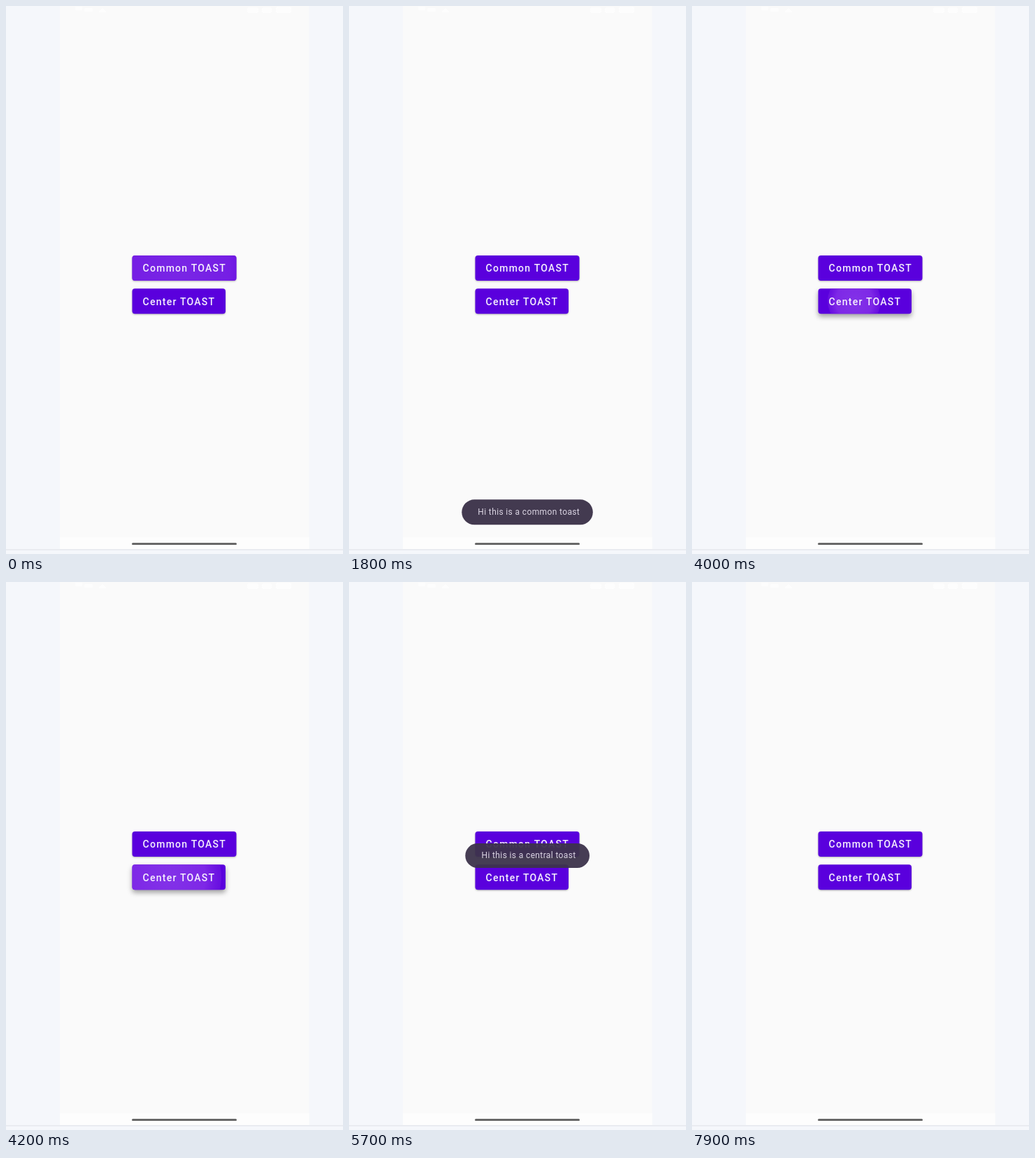
Write an HTML page that moves like this. It is 482 px wide and 782 px high and loops after 8 s.

```html
<!DOCTYPE html>
<html lang="en">
<head>
<meta charset="utf-8">
<style>
  html, body { margin: 0; width: 100%; height: 100%; overflow: hidden; background: #f5f7fb; }
  svg { display: block; }
  text { font-family: Roboto, "Open Sans", sans-serif; }
  .label { font-size: 14px; font-weight: 500; letter-spacing: 1.25px; fill: #f6f1fd; }
  .note { font-size: 12px; letter-spacing: .37px; fill: #dcd6e4; }
  .status { fill: #fff; opacity: .75; }
</style>
</head>
<body>
<svg width="482" height="782" viewBox="0 0 482 782">
  <defs>
    <clipPath id="commonClip"><rect x="180.5" y="356" width="149" height="36" rx="4"/></clipPath>
    <clipPath id="centerClip"><rect x="180.5" y="403.3" width="133.5" height="36" rx="4"/></clipPath>
    <radialGradient id="glow">
      <stop offset="0" stop-color="#8a3bea"/>
      <stop offset=".7" stop-color="#842fe8"/>
      <stop offset="1" stop-color="#7a22e4" stop-opacity=".5"/>
    </radialGradient>
  </defs>

  <rect width="482" height="782" fill="#f5f7fb"/>
  <rect x="77" width="356.5" height="775" fill="#fafafa"/>
  <rect x="77" y="758" width="356.5" height="17" fill="#fdfdfd"/>
  <rect y="775" width="482" height="1.6" fill="#e7e9ee"/>
  <g class="status">
    <rect x="99" y="1" width="10" height="5" rx="2"/>
    <rect x="112" y="3" width="12" height="5" rx="2"/>
    <path d="M132 9l6-6 6 6z"/>
    <rect x="345" y="2" width="16" height="8" rx="3"/>
    <rect x="366" y="2" width="14" height="8" rx="3"/>
    <rect x="386" y="1" width="22" height="9" rx="3"/>
  </g>
  <rect x="180" y="766" width="150" height="3" rx="1.5" fill="#686868"/>

  <g id="commonButton">
    <rect x="180.5" y="356" width="149" height="36" rx="4" fill="#5a00dd"/>
  </g>
  <circle id="commonRipple" cx="250" cy="374" r="100" fill="url(#glow)" clip-path="url(#commonClip)"/>
  <text class="label" x="195.6" y="379.4">Common TOAST</text>

  <g id="centerButton">
    <rect x="180.5" y="403.3" width="133.5" height="36" rx="4" fill="#5a00dd"/>
  </g>
  <circle id="centerRipple" cx="232" cy="421" fill="url(#glow)" clip-path="url(#centerClip)"/>
  <text class="label" x="195.6" y="426.7">Center TOAST</text>

  <g id="commonToast">
    <rect x="161.3" y="704.3" width="187.5" height="36" rx="18" fill="#433a50"/>
    <text class="note" x="184.3" y="726.4">Hi this is a common toast</text>
  </g>
  <g id="centerToast">
    <rect x="166.3" y="373" width="177.7" height="35" rx="17.5" fill="#3d334b" fill-opacity=".95"/>
    <text class="note" x="189.5" y="394.4">Hi this is a central toast</text>
  </g>
</svg>
<script>
const LOOP = 8000, STEP = 100;
const el = id => document.getElementById(id);
const progress = (t, from, to) => Math.min(1, Math.max(0, (t - from) / (to - from)));
const easeOut = p => 1 - (1 - p) ** 3;

// Rises and fades in, then sinks slightly and fades out.
function toast(id, t, enter, leave) {
  const show = easeOut(progress(t, enter, enter + 300));
  const hide = progress(t, leave, leave + 300);
  el(id).setAttribute('opacity', show * (1 - hide * hide));
  el(id).setAttribute('transform', `translate(0 ${28 * (1 - show) + 4 * hide})`);
}

function shadow(id, lift) {
  el(id).style.filter =
    `drop-shadow(0 ${1 + 3 * lift}px ${1.2 + 2.3 * lift}px rgba(0,0,0,${.28 + .08 * lift}))`;
}

function draw(t) {
  el('commonRipple').setAttribute('opacity', .65 * (1 - progress(t, 0, 400)));
  shadow('commonButton', 0);

  const grow = progress(t, 3800, 4300);
  el('centerRipple').setAttribute('r', grow * 95);
  el('centerRipple').setAttribute('opacity', .85 * progress(t, 3750, 3950) * (1 - progress(t, 4200, 4600)));
  shadow('centerButton', progress(t, 3700, 3900) * (1 - progress(t, 4200, 4400)));

  toast('commonToast', t, 100, 3200);
  toast('centerToast', t, 4200, 7400);
}

function tick(now) {
  draw(Math.floor(now % LOOP / STEP) * STEP);
  requestAnimationFrame(tick);
}
draw(0);
requestAnimationFrame(tick);
</script>
</body>
</html>
```
